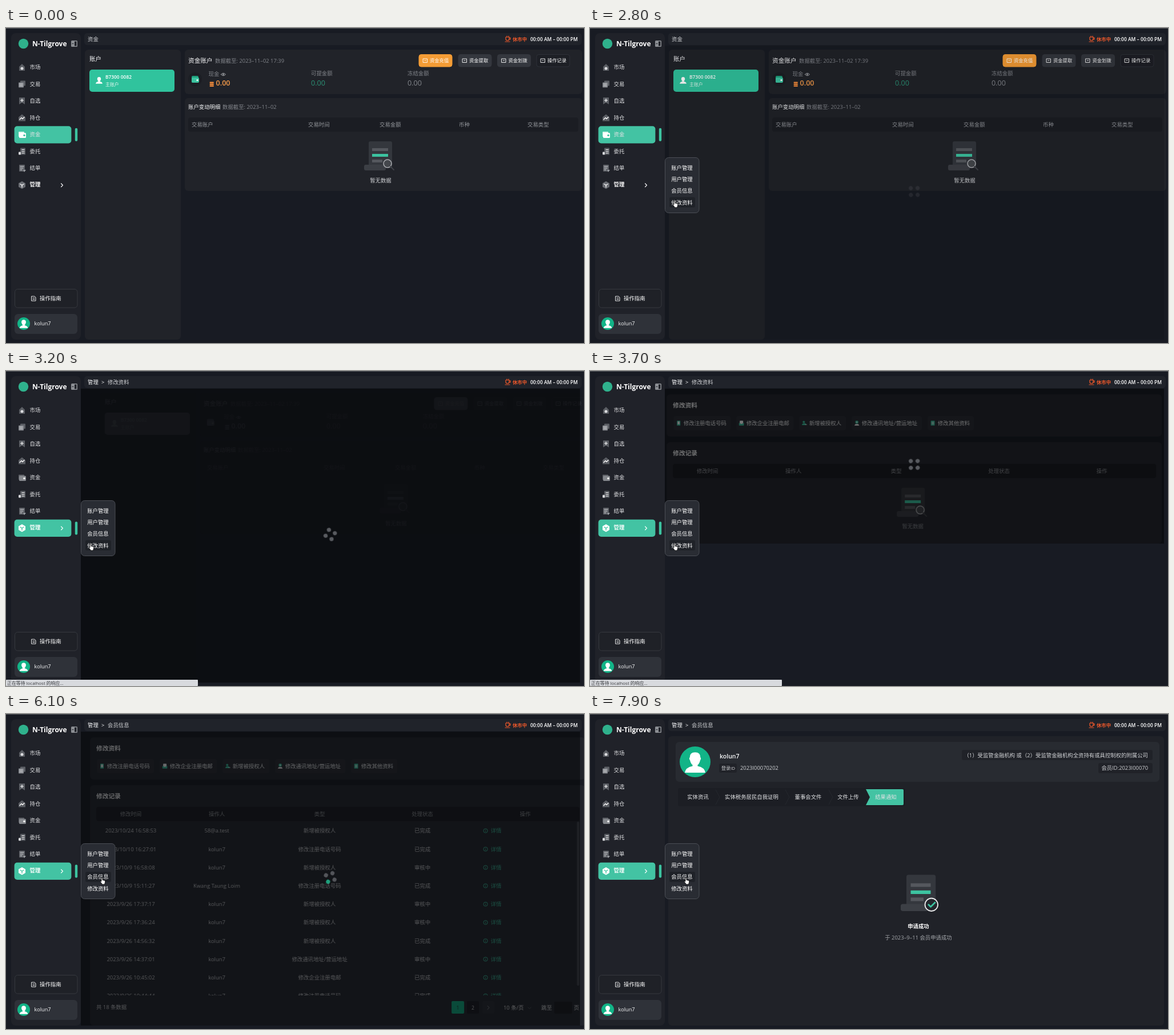
Recreate the animation shown at these times as an HTML page. Size 1012 px wide and 553 px high, loop 8 s.

```html
<!DOCTYPE html>
<html lang="zh-CN">
<head>
<meta charset="utf-8">
<title>资金终端</title>
<style>
html, body { margin: 0; width: 100%; height: 100%; overflow: hidden; background: #181b23; }
svg { display: block; width: 100vw; height: 100vh; }
text { font-family: "Open Sans", "Noto Sans CJK SC", "Noto Sans CJK", sans-serif; white-space: pre; }

/* One 8 s clock drives everything: 1% = 80 ms */
[data-a] { animation: 8s linear infinite; }
.fund-on { animation-name: fund-on; animation-timing-function: step-end; }
.manage-on { animation-name: manage-on; animation-timing-function: step-end; }
.edit-on { animation-name: edit-on; animation-timing-function: step-end; }
.member-on { animation-name: member-on; animation-timing-function: step-end; }
.empty { animation-name: empty; animation-timing-function: step-end; }
.rows { animation-name: rows; animation-timing-function: step-end; }
.result { animation-name: result; animation-timing-function: step-end; }
.status { animation-name: status; animation-timing-function: step-end; }
.arrow { animation-name: arrow; animation-timing-function: step-end; }
.hand { animation-name: hand; animation-timing-function: step-end; }
.hover-edit { animation-name: hover-edit; animation-timing-function: step-end; }
.hover-member { animation-name: hover-member; animation-timing-function: step-end; }
.fund { animation-name: fund; animation-timing-function: ease; }
.edit { animation-name: edit; animation-timing-function: ease; }
.member { animation-name: member; animation-timing-function: ease; }
.menu { animation-name: menu; animation-timing-function: ease-out; transform-origin: 161px 276px; }
.cursor { animation-name: cursor; animation-timing-function: ease-in-out; }
.mask1 { animation-name: mask1; }
.mask2 { animation-name: mask2; }
.mask3 { animation-name: mask3; }
.spin { animation-name: spin; }

@keyframes fund-on { 0% { opacity: 1 } 36.2%, 100% { opacity: 0 } }
@keyframes manage-on { 0% { opacity: 0 } 36.2%, 100% { opacity: 1 } }
@keyframes edit-on { 0% { opacity: 0 } 36.2% { opacity: 1 } 75%, 100% { opacity: 0 } }
@keyframes member-on { 0% { opacity: 0 } 75%, 100% { opacity: 1 } }
@keyframes empty { 0% { opacity: 1 } 49.5%, 100% { opacity: 0 } }
@keyframes rows { 0% { opacity: 0 } 49.5%, 100% { opacity: 1 } }
@keyframes result { 0% { opacity: 0 } 90.5%, 100% { opacity: 1 } }
@keyframes status { 0% { opacity: 0 } 37.3% { opacity: 1 } 49.5%, 100% { opacity: 0 } }
@keyframes arrow { 0% { opacity: 0 } 15% { opacity: 1 } 26%, 100% { opacity: 0 } }
@keyframes hand { 0% { opacity: 0 } 26%, 100% { opacity: 1 } }
@keyframes hover-edit { 0% { opacity: 0 } 28% { opacity: 1 } 70%, 100% { opacity: 0 } }
@keyframes hover-member { 0% { opacity: 0 } 70%, 100% { opacity: 1 } }
@keyframes fund {
  0%, 36.2% { opacity: 1; transform: none; filter: none }
  36.21% { filter: grayscale(1) }
  42.4%, 100% { opacity: 0; transform: translateX(30px); filter: grayscale(1) }
}
@keyframes edit {
  0%, 42.6% { opacity: 0; transform: translateX(-30px) }
  48.9%, 75% { opacity: 1; transform: none }
  81.2%, 100% { opacity: 0; transform: translateX(30px) }
}
@keyframes member {
  0%, 81.4% { opacity: 0; transform: translateX(-30px) }
  87.6%, 100% { opacity: 1; transform: none }
}
@keyframes menu {
  0%, 21.5% { opacity: 0; transform: scale(.8) }
  24%, 100% { opacity: 1; transform: none }
}
@keyframes cursor {
  0%, 15% { transform: translate(230px, 400px) }
  21%, 23% { transform: translate(85px, 282px) }
  29%, 67% { transform: translate(145px, 303px) }
  72%, 100% { transform: translate(165px, 287px) }
}
@keyframes mask1 { 0%, 34.5% { opacity: 0 } 37%, 42.5% { opacity: 1 } 42.6%, 100% { opacity: 0 } }
@keyframes mask2 { 0%, 42.5% { opacity: 0 } 42.6%, 49.5% { opacity: 1 } 53%, 100% { opacity: 0 } }
@keyframes mask3 { 0%, 74% { opacity: 0 } 76.5%, 90.5% { opacity: 1 } 94%, 100% { opacity: 0 } }
@keyframes spin { to { transform: rotate(2400deg) } }
</style>
</head>
<body>
<svg id="stage" viewBox="0 0 1012 553" preserveAspectRatio="none"></svg>
<script>
const GREEN = '#3cc3a0', WHITE = '#f8f9fa', SOFT = '#d0d2d5', GREY = '#82858b', PANEL = '#212329';
const USER = 'kolun7';

// Text is placed by its vertical centre
const text = (x, cy, s, { size = 9.4, fill = SOFT, w = 400, at = 'start' } = {}) =>
  `<text x="${x}" y="${cy + size * .365}" font-size="${size}" fill="${fill}" font-weight="${w}" text-anchor="${at}">${s}</text>`;
const mid = (x, cy, s, o = {}) => text(x, cy, s, { ...o, at: 'middle' });
const box = (x, y, x2, y2, fill, r = 0, extra = '') =>
  `<rect x="${x}" y="${y}" width="${x2 - x}" height="${y2 - y}" rx="${r}" fill="${fill}" ${extra}/>`;
const dot = (x, y, r, fill, extra = '') => `<circle cx="${x}" cy="${y}" r="${r}" fill="${fill}" ${extra}/>`;
const path = (d, fill, extra = '') => `<path d="${d}" fill="${fill}" ${extra}/>`;
const line = (d, color, w = 1) => path(d, 'none', `stroke="${color}" stroke-width="${w}" stroke-linecap="round" stroke-linejoin="round"`);
const at = (x, y, body, scale = 1) => `<g transform="translate(${x} ${y}) scale(${scale})">${body}</g>`;
const live = (name, body) => `<g class="${name}" data-a>${body}</g>`;

const person = (fill = '#fff') =>
  path('M-5-5Q-5-9.8 0-9.8T5-5Q6-4 4.8-2.4 4 1 2.4 2V3.2Q9 4.4 9.6 9.4H-9.6Q-9 4.4-2.4 3.2V2Q-4 1-4.8-2.4-6-4-5-5z', fill);
const avatar = (x, y, r) => dot(x, y, r, '#12b487') + at(x, y + r * .06, person(), r / 14.5);

// Paper scroll used by the blank states
const paper = badge =>
  box(-20, -23, 21, 24, '#34373d', 3) + box(-28, 18, 10, 28, '#3c3f45', 3) +
  box(-14, -11, 14, -6, '#55585e') + box(-14, -1, 14, 4, GREEN) + box(-14, 9, 4, 14, '#55585e') + badge;
const lens = dot(13, 16, 7, '#44474c', 'stroke="#a7a9ad" stroke-width="1.6"') + line('M18 21L24 27', '#3f4248', 2);
const tick = dot(15, 19, 9, '#24272d', 'stroke="#e8e9ea" stroke-width="1.5"') + line('M11 19L14 22 20 16', GREEN, 2.2);

const navIcons = [
  path('M-5-1L0-6 5-1V6H-5z', '#5b5e64') + dot(0, 2, 2.5, '#dcdde0'),
  box(-3, -6, 6, 3, '#5b5e64', 1) + box(-6, -3, 3, 6, '#83868c', 1) + line('M-4 0H1M-4 3H1', '#e0e1e3'),
  path('M-5-6H5V6L0 3-5 6z', '#5b5e64') + line('M0-3.5V1.5M-2.5-1H2.5', '#fff', 1.2),
  path('M-6-1L0-6 6-1V6H-6z', '#5b5e64') + line('M-4 3L-1 0 1 2 4-1', '#fff', 1.3),
  box(-6, -5, 4, 4, '#5b5e64', 1) + box(-5, -3, 7, 6, '#85888d', 1.5) + dot(4, 1.5, 1.7, '#fff'),
  box(-3, -6, 6, 6, '#5b5e64', 1) + box(-6, 1, -2, 6, '#d5d6d9', 1) + line('M0-3H4M0 0H4M0 3H4', '#fff'),
  box(-5, -6, 5, 6, '#5b5e64', 1) + line('M-3-3H3M-3 0H2M-3 3H0', '#e0e1e3') + path('M2 3H7L4 7z', '#9a9da2'),
  path('M0-6.5L6-3V3.5L0 7-6 3.5V-3z', '#6a6d73') + line('M-3-1.5L0 0.5 3-1.5M0 .5V4', '#fff', 1.3)
];
const navNames = ['市场', '交易', '自选', '持仓', '资金', '委托', '结单', '管理'];
const navY = i => 69 + i * 29.5;

const active = (y, icon) =>
  box(14.6, y - 15.1, 114.4, y + 15.1, '#43c3a3', 5) + box(120.8, y - 11.5, 125.2, y + 11.5, GREEN, 2) + icon;

function sidebar() {
  const fundIcon = at(28, 187, box(-6, -5, 4, 4, '#d9f5ec', 1) + box(-5, -3, 7, 6, '#fff', 1.5) + dot(4, 1.5, 1.7, GREEN));
  const manageIcon = at(28, 275.5, path('M0-6.5L6-3V3.5L0 7-6 3.5V-3z', '#fff') + line('M-3-1.5L0 .5 3-1.5M0 .5V4', GREEN, 1.3));
  return box(9, 9, 131, 547, '#202229', 8) +
    dot(30.5, 27.5, 8.7, '#2fb18c') + text(46, 27.5, 'N-Tilgrove', { size: 12, w: 700, fill: '#fff' }) +
    box(114, 22, 125, 33, '#8b8e93', 1.5) + box(120, 23.5, 123.5, 31.5, '#202229') + line('M116 27.5H118', '#202229') +
    navIcons.map((icon, i) => at(28, navY(i), icon)).join('') +
    live('fund-on', active(187.3, fundIcon)) + live('manage-on', active(275.9, manageIcon)) +
    navNames.map((s, i) => text(41.5, i < 7 ? navY(i) : 275, s, { fill: i < 7 ? '#e2e3e5' : '#fff', w: i < 7 ? 400 : 700 })).join('') +
    line('M96.5 273L99.5 276 96.5 279', '#fff', 1.1) +
    box(15.5, 458.5, 125, 491, '#1f2127', 5, 'stroke="#36393f"') +
    line('M45 471H50L52 473V479H45zM47 474H50M47 476.5H50', '#fff', .9) +
    text(59, 475, '操作指南', { fill: '#fff', w: 500 }) +
    box(15, 502, 125, 537, '#2f3239', 6) + avatar(31, 519, 11) + text(49.5, 519, USER, { size: 9.2, fill: WHITE });
}

function header() {
  const crumb = name => text(143, 19.5, '管理', { fill: WHITE, w: 500 }) + text(167, 19.5, '&gt;', { fill: WHITE, w: 500 }) + text(178, 19.5, name);
  return box(137, 9, 1008, 30, '#20232a', 5) +
    live('fund-on', text(143, 19.5, '资金')) +
    live('edit-on', crumb('修改资料')) + live('member-on', crumb('会员信息')) +
    line('M875 16H881V19Q881 22 878 22T875 19zM881 17H883V20H881M874 24H882M877 14V15M880 14V15', '#f0592b', 1.2) +
    text(887, 19.5, '休市中', { size: 8.4, fill: '#f0592b', w: 600 }) +
    text(918, 19.5, '00:00 AM – 00:00 PM', { size: 8.5, fill: '#fff', w: 600 });
}

function fundPage() {
  const button = (x, name, fill, stroke = fill) =>
    box(x, 46.5, x + 58, 68, fill, 4, `stroke="${stroke}"`) +
    line(`M${x + 7.5} 54H${x + 14.5}V60.5H${x + 7.5}zM${x + 10} 57H${x + 12}`, '#fff', .9) +
    text(x + 19, 57.3, name, { size: 8.3, fill: '#fff', w: 500 });
  const amount = (x, name, fill) => text(x, 80, name, { fill: GREY }) + text(x, 96, '0.00', { size: 12.6, fill });
  const heads = [[325, '交易账户'], [529, '交易时间'], [654, '交易金额'], [793, '币种'], [913, '交易类型']];
  return box(138, 38, 306, 547, PANEL, 6) + box(313, 38, 1009, 116, PANEL, 6) + box(313, 123, 1009, 286, PANEL, 6) +
    text(146, 54.5, '账户', { size: 10.5, fill: WHITE, w: 500 }) +
    box(146, 73, 295, 112, '#30c39d', 5) + at(163, 92, person(), .62) +
    text(174, 85.7, 'B7300 0082', { size: 8.4, fill: '#fff', w: 600 }) + text(174, 99, '主账户', { size: 7.9, fill: '#e6f8f2' }) +
    text(319, 57, '资金账户', { size: 10.7, fill: WHITE, w: 500 }) + text(366, 57.5, '数据截至: 2023–11–02 17:39', { fill: GREY }) +
    button(723, '资金充值', '#f49c35') + button(792, '资金提取', '#34373e') +
    button(860.5, '资金划拨', '#34373e') + button(929, '操作记录', '#1d1f25', '#2e3138') +
    dot(331, 90, 12, '#1c1e24') + box(325, 84, 337, 96, '#1f9f7c', 2) + box(325, 87, 338, 96, GREEN, 2) + dot(335, 91.5, 1.6, '#fff') +
    text(354.5, 80.5, '现金', { fill: GREY }) + line('M376.5 81.5Q380.5 77 384.5 81.5 380.5 86 376.5 81.5z', '#a8aaae') + dot(380.5, 81.5, 1.3, '#a8aaae') +
    [94.5, 97.5, 100.5].map(y => box(356.5, y, 364, y + 2.4, '#e8863a', 1.2)).join('') +
    text(367.5, 96, '0.00', { size: 12.6, fill: '#f39a4a', w: 600 }) +
    amount(534, '可提金额', '#2b8f74') + amount(703, '冻结金额', GREY) +
    text(319, 139, '账户变动明细', { fill: WHITE, w: 500 }) + text(379, 139, '数据截至: 2023–11–02', { fill: GREY }) +
    box(319, 157, 1002, 182, '#1b1d23', 4) + heads.map(([x, s]) => text(x, 170, s, { fill: '#94979c' })).join('') +
    at(655, 222, paper(lens)) + mid(656, 267.5, '暂无数据');
}

function editPage() {
  const kinds = ['修改注册电话号码', '修改企业注册电邮', '新增被授权人', '修改通讯地址/营运地址', '修改其他资料'];
  const spans = [[150, 250], [260, 360], [370, 452], [462, 585], [595, 676]];
  const marks = [
    box(-3.5, -5, 3.5, 5, GREEN, 1) + box(-2, -3.5, 2, 2.5, '#fff'),
    box(-3.5, -5, 3.5, 2, '#fff', 1) + path('M-5-1L0 2 5-1V5H-5z', GREEN),
    dot(-1, -2.5, 2.3, GREEN) + path('M-5 4Q-4 0 0 0T4 4z', GREEN) + line('M2 3H5', '#fff'),
    dot(0, -2, 3.3, GREEN) + dot(0, -2, 1.3, '#fff') + path('M-5 5L-3 2H3L5 5z', '#fff'),
    box(-4, -5, 4, 5, GREEN, 1) + line('M-2-2H2M-2 0H2M-2 2H2', '#fff', .9)
  ];
  const done = '已完成', wait = '审核中';
  const rows = [
    ['10/24 16:58:53', '58@a.test', 2, done], ['10/10 16:27:01', USER, 0, done],
    ['10/9 16:58:08', USER, 2, wait], ['10/9 15:11:27', 'Kwang Taung Loim', 0, done],
    ['9/26 17:37:17', USER, 2, wait], ['9/26 17:36:24', USER, 2, wait],
    ['9/26 14:56:32', USER, 2, done], ['9/26 14:37:01', USER, 3, wait],
    ['9/26 10:45:02', USER, 1, done], ['9/26 10:44:44', USER, 0, done]
  ];
  const row = ([time, who, kind, state], i) => {
    const y = 205 + i * 32.2;
    return mid(209.5, y, '2023/' + time) + mid(360, y, who) + mid(540, y, kinds[kind]) + mid(720, y, state) +
      dot(830.5, y, 3.6, 'none', `stroke="${GREEN}"`) + line(`M830.5 ${y}V${y + 1.6}M830.5 ${y - 1.8}V${y - 1.7}`, GREEN, .9) +
      text(839.5, y, '详情', { fill: GREEN });
  };
  const heads = [[209.5, '修改时间'], [360, '操作人'], [540, '类型'], [720, '处理状态'], [900, '操作']];
  const card = '#262930', title = { size: 10.7, fill: WHITE, w: 600 };
  const pager = text(149, 515, '共 18 条数据') +
    box(771, 504, 793, 526, '#12b487', 2) + mid(782, 515.5, '1', { size: 8.4, fill: '#163a31' }) +
    box(798, 504, 819, 526, '#1c1e24', 2) + mid(808.5, 515.5, '2', { size: 8.4 }) +
    box(825, 504, 846, 526, '#2b2e35', 2) + line('M834 512.5L837 515.5 834 518.5', GREY) +
    text(862, 516, '10 条/页', { fill: '#e6e7e9' }) + line('M905 515L907.5 517.5 910 515', '#55585e') +
    text(928, 515.5, '跳至', { fill: '#e6e7e9' }) + box(951, 505, 982, 526, '#1a1c22', 2) + text(985, 515.5, '页', { fill: '#e6e7e9' });
  return box(138, 41, 1005, 115, card, 6) + text(149, 60, '修改资料', title) +
    kinds.map((s, i) => box(spans[i][0], 79, spans[i][1], 104, '#2c2f36', 4) +
      at(spans[i][0] + 9, 91.5, marks[i], .85) + text(spans[i][0] + 17.7, 91.5, s, { fill: WHITE, w: 500 })).join('') +
    live('empty', box(138, 125, 1005, 303, card, 6) + at(569, 228, paper(lens)) + mid(569, 273, '暂无数据', { fill: GREY })) +
    live('rows', box(138, 125, 1005, 547, card, 6) +
      `<g clip-path="url(#list)">${rows.map(row).join('')}</g>` + box(990.5, 189, 994.5, 477, '#474a52', 2) + pager) +
    text(149, 144.5, '修改记录', title) + box(149, 163, 995, 188, '#1b1d23', 4) +
    heads.map(([x, s]) => mid(x, 176, s, { fill: '#94979c' })).join('');
}

function memberPage() {
  const tabs = [[189, '实体资讯'], [283, '实体税务居民自我证明'], [382, '董事会文件'], [452, '文件上传'], [518, '结果通知']];
  const chip = (x, y, x2, y2) => box(x, y, x2, y2, '#202228', 3);
  return box(137, 39, 1005, 547, '#202228', 6) +
    live('result', box(150, 49, 997, 119, '#282b31', 6) +
      chip(226, 87, 257, 103) + chip(651, 63, 985, 81) + chip(890, 86, 985, 104) +
      at(579, 311, paper(tick), 1.25) + mid(575, 372.5, '申请成功', { fill: '#fff', w: 600 }) +
      mid(575, 392.5, '于 2023–9–11 会员申请成功', { fill: '#a5a8ac' })) +
    avatar(184, 84, 27) + text(227, 74.5, USER, { size: 10.5, fill: WHITE, w: 600 }) +
    text(230, 95, '登录ID', { size: 8 }) + text(263, 94.5, '2023I00070202') +
    text(977, 72.5, '（1）受监管金融机构 或（2）受监管金融机构全资持有或具控制权的附属公司', { at: 'end' }) +
    text(977, 94.5, '会员ID:2023I00070', { at: 'end' }) +
    box(154, 130, 552, 162, '#1c1e24', 4) +
    [220, 342, 418].map(x => line(`M${x} 133L${x + 7} 146 ${x} 159`, '#25282e')).join('') +
    path('M483 132H547Q549 132 549 134V158Q549 160 547 160H483L490 146z', '#43c3a3') +
    tabs.map(([x, s]) => mid(x, 146, s, { fill: '#e2e3e5' })).join('');
}

// Dimmed area with four turning dots
function mask(name, bottom, cy, start, first = '#595b60') {
  const dots = [0, 90, 180, 270].map((a, i) => `<g transform="rotate(${a + start})">${dot(8.4, 0, 3.6, i ? '#595b60' : first)}</g>`).join('');
  return live(name, box(131, 31, 1005, bottom, '#000', 0, 'opacity=".48"') + at(567.7, cy, live('spin', dots)));
}

function menu() {
  const hover = (name, y) => live(name, box(139, y - 9, 184, y + 9, '#1f2228', 3));
  return live('menu', box(131.5, 227.5, 191, 324.5, '#292c33', 6, 'stroke="#4b4e55"') +
    hover('hover-edit', 306) + hover('hover-member', 286) +
    ['账户管理', '用户管理', '会员信息', '修改资料'].map((s, i) => mid(161, 245.5 + i * 20.2, s, { fill: '#fff', w: 500 })).join(''));
}

const arrow = path('M0 0V10.5L2.4 8.4 4 12 5.6 11.2 4.1 7.8H7.2z', '#111', 'stroke="#fff" stroke-width=".9"');
const hand = path('M2 1Q3-.3 4 1V4.5L7.5 5.3Q9 6 8.7 8L7.5 12H3.5L.3 7.5Q.3 6 2 7z', '#fff', 'stroke="#111" stroke-width=".8"');

document.getElementById('stage').innerHTML =
  '<defs><clipPath id="list"><rect x="138" y="189" width="867" height="305"/></clipPath></defs>' +
  box(0, 0, 1012, 553, '#181b23') + box(0, 0, 1012, 1, '#54565b') +
  live('fund', fundPage()) + live('edit', editPage()) + live('member', memberPage()) +
  mask('mask1', 547, 287, 14) + mask('mask2', 303, 164, 14) + mask('mask3', 547, 287, 87, '#1fae86') +
  header() + sidebar() + menu() +
  live('status', box(0, 542, 336, 553, '#d8dade', 1) + text(2, 548.3, '正在等待 localhost 的响应...', { size: 7.9, fill: '#3a3c40' })) +
  live('cursor', live('arrow', arrow) + live('hand', hand));
</script>
</body>
</html>
```
